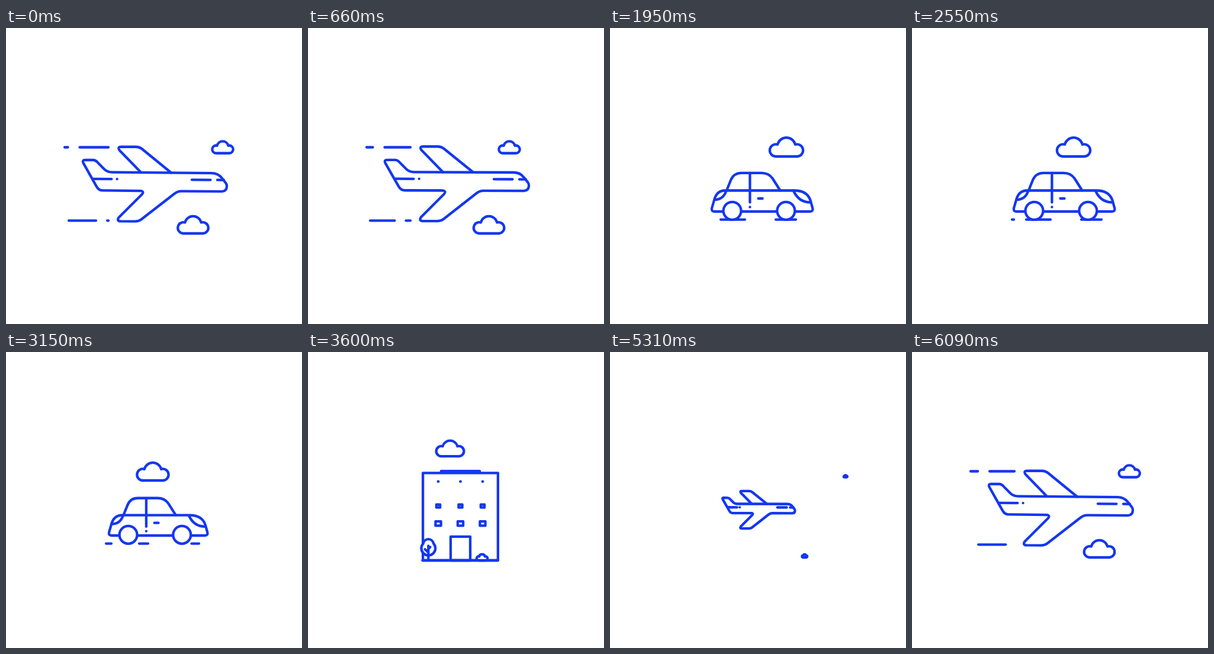
Write an HTML page that moves like this. It is 500 px wide and 500 px high and loops after 6.12 s.

```html
<!DOCTYPE html>
<html lang="en">
<head>
<meta charset="utf-8">
<title>Travel loop</title>
<style>
  html, body { margin: 0; width: 100%; height: 100%; overflow: hidden; background: #fff; }
  svg { display: block; width: 100vw; height: 100vh; }
  path {
    fill: none; stroke: #1437f0; stroke-width: 4.3;
    stroke-linecap: round; stroke-linejoin: round;
    vector-effect: non-scaling-stroke;
  }
  path.solid { fill: #fff; }
</style>
</head>
<body>
<svg id="stage" viewBox="0 0 500 500"></svg>
<script>
const LOOP = 6120, STEP = 30;
const SVG = 'http://www.w3.org/2000/svg';
const stage = document.getElementById('stage');

function add(parent, tag, attrs = {}) {
  const el = document.createElementNS(SVG, tag);
  for (const name in attrs) el.setAttribute(name, attrs[name]);
  return parent.appendChild(el);
}
const group = parent => add(parent, 'g');
const line = (parent, d) => add(parent, 'path', { d });
const solid = (parent, d) => add(parent, 'path', { d, class: 'solid' });

const unit = (t, start, length) => Math.min(1, Math.max(0, (t - start) / length));
const mix = (a, b, p) => a + (b - a) * p;
const outQuad = u => 1 - (1 - u) ** 2;
const outCubic = u => 1 - (1 - u) ** 3;
const outBack = u => 1 + 2.7 * (u - 1) ** 3 + 1.7 * (u - 1) ** 2;

function show(el, on) { el.setAttribute('display', on ? 'inline' : 'none'); }

// Puts the shape's anchor (ax, ay) at (x, y), scaled around it.
function place(el, x, y, sx, sy = sx, ax = 0, ay = 0) {
  show(el, sx > 0 && sy > 0);
  el.setAttribute('transform', `translate(${x} ${y}) scale(${sx} ${sy}) translate(${-ax} ${-ay})`);
}

const CLOUD = 'M18 0A10.3 10.3 0 1 0 15 -20.2A15.5 15.5 0 0 0 -15 -20.2A10.3 10.3 0 1 0 -18 0Z';
const box = (w, h) => `M${-w / 2} ${-h / 2}h${w}v${h}h${-w}Z`;

// Dashes running left inside a window; each is [right end, length].
function drawDashes(el, { y, left, right, dashes, period, speed }, t, size) {
  let d = '';
  if (size > 0) {
    for (const [end, length] of dashes) {
      const base = end - speed * t;
      const first = Math.floor((left - base) / period);
      for (let n = first; n < first + 5; n++) {
        const tip = base + n * period;
        const a = Math.max(left, tip - length * size);
        const b = Math.min(right, tip);
        if (b >= a) d += `M${a} ${y}H${b + 0.01}`;
      }
    }
  }
  el.setAttribute('d', d);
}

// Plane
const plane = group(stage);
const farCloud = solid(plane, CLOUD);
const nearCloud = solid(plane, CLOUD);
const topTrail = line(plane, '');
const lowTrail = line(plane, '');
const craft = group(plane);
line(craft, 'M228 243L191.5 206Q187.5 200 194 199.8H219Q225 200 229 203L279 243');
line(craft, 'M147 222.7H133Q128 223 130.5 228L153.5 268Q157 274 164 274H228Q234 275 230 280' +
  'L191 319.5Q187.5 325.5 194 325.7H219Q225 325.5 229 322.5L284 279Q290 274 297 274' +
  'H365Q373 273.5 373.2 265Q373.2 262 371 259L364 250.5Q358 243 347 243H179' +
  'Q171 243 166 238L155 227Q151 222.7 147 222.7Z');
line(craft, 'M148 254.5H178.5M187.7 254.5h.01M314 254.5H345.5M357 254.5H368');

function drawPlane(now) {
  const t = now > LOOP / 2 ? now - LOOP : now;
  const out = unit(t, 1290, 330) ** 2;
  const into = outCubic(unit(t, -830, 330));
  const tilt = 0.25 + 0.25 * Math.cos(Math.PI * Math.min(t, 1290) / 1290);
  const s = mix(0.4, 1, into) * mix(1, 0.5, out);
  craft.setAttribute('transform',
    `translate(251 270) scale(${s}) translate(-251 -270) rotate(${tilt} 110 245)`);

  const puff = into * (1 - out);
  place(farCloud, 366 - 0.0393 * t, 211.5, 0.63 * puff);
  place(nearCloud, 316 - 0.0157 * t, 347, 0.915 * puff);

  const size = unit(-t, -1350, 300);
  const reach = 173 - 0.215 * (t + 470);
  const live = t > -470 ? size : 0;
  drawDashes(topTrail, { y: 201.5, left: Math.max(99, reach), right: 173,
    dashes: [[104.5, 55]], period: 75, speed: 0.2198 }, t, live);
  drawDashes(lowTrail, { y: 325.3, left: Math.max(105, reach), right: 173,
    dashes: [[152, 46]], period: 65, speed: 0.2054 }, t, live);
}

// Car
const car = group(stage);
const carCloud = solid(car, CLOUD);
const road = line(car, '');
const shell = group(car);
line(shell, 'M191.5 310H176.5Q171 310 172 304.5L176.5 289Q180.5 275 194 274.5H311' +
  'Q333 274.5 338.5 291L342.3 304.5Q343.5 310 337.5 310H312.5M221.5 310H282');
line(shell, 'M197 274.5L204 257Q209 244.8 222 244.8H256Q268 244.8 274.5 254L287.5 274.5');
line(shell, 'M236.4 245V294.5M236.4 302.5h.01M250.5 288H257.5');
line(shell, 'M176.5 290Q191 290 196 276M310.5 276Q319 294 337.5 294.5');
const wheels = group(car);
for (const x of [206.5, 297.3])
  solid(wheels, `M${x - 15} 308.8a15 15 0 0 1 30 0a15 15 0 0 1 -30 0Z`);

function drawCar(t) {
  const u = unit(t, 3060, 390), out = u * u;
  const start = unit(t, 1600, 340);
  const into = outCubic(start);
  const s = mix(0.5, 1, into);
  place(shell, 257.5, 310, s * (1 - 0.45 * out), s * (1 - 0.56 * out), 257.5, 310);
  place(wheels, 257.5, 310, s * (1 - 0.5 * out * out), undefined, 257.5, 310);
  place(carCloud, 298 - 0.0417 * (t - 1950), 217 + 60 * (1 - outBack(start)), into * (1 - out));
  const size = unit(t, 1650, 200) * unit(-t, -3260, 300);
  drawDashes(road, { y: 323.6, left: 169, right: 330,
    dashes: [[228, 41], [314, 34]], period: 148, speed: 0.2367 }, t - 1950, size);
}

// Building
const house = group(stage);
const houseCloud = solid(house, CLOUD);
const roof = solid(house, 'M-52.5 0V-28H52.5V0Z');
const sign = line(house, 'M260 166.8h.01M270 166.8H297.5');
const walls = solid(house, 'M-67.5 0V-172H67.5V0Z');
const rows = [
  { y: 206, drop: 13, start: 3596 },
  { y: 242, drop: 26, start: 3535 },
  { y: 278, drop: 21, start: 3500 }
].map(row => ({ ...row, panes: [220, 257.5, 295].map(x => ({ x, el: line(house, box(21, 16.5)) })) }));
const door = line(house, 'M-18 0V-44H18V0Z');
const ground = line(house, '');
const tree = group(house);
solid(tree, 'M153.5 280A22.3 22.3 0 0 1 197.5 280A30 30 0 1 1 153.5 280Z');
line(tree, 'M175.5 290V352M161 304.5L175.5 318M183.5 295L175.5 302.5');
const bush = solid(house, CLOUD);

function drawHouse(t) {
  const leave = 1 - unit(t, 4930, 390) ** 2;
  const leaveFast = 1 - unit(t, 4930, 300) ** 2;
  const p = outCubic(unit(t, 3450, 400)) * leave;
  const top = 352 - 172 * mix(0.42, 1, p);

  place(houseCloud, 240 - 0.0373 * (t - 3600), 159 + 70 * (1 - p), 0.96 * mix(0.45, 1, p));
  place(walls, 257.5, 352, mix(0.75, 1, p), mix(0.42, 1, p));
  place(door, 257.5, 352, mix(0.67, 1, p), mix(0.63, 1, p));

  const r = outQuad(unit(t, 3580, 330)) * leaveFast;
  place(roof, 257.5, top, r > 0 ? mix(0.57, 1, r) : 0, r);
  place(sign, 260, top - 13.2 * r, unit(r, 0.75, 0.25), 1, 260, 166.8);

  for (const row of rows) {
    const s = outQuad(unit(t, row.start, 400)) * leaveFast;
    for (const pane of row.panes) place(pane.el, pane.x, row.y + row.drop * (1 - s), s);
  }

  const q = outQuad(unit(t, 3500, 450)) * leave;
  place(tree, 175.5 + 46 * (1 - q), 352, q, q, 175.5, 352);
  ground.setAttribute('d', `M${165.5 + 46 * (1 - q)} 352H${257.5 + 67.5 * mix(0.75, 1, p)}`);

  const b = outQuad(unit(t, 3530, 450)) * leave;
  place(bush, 329 - 49 * (1 - b), 352, 1.14 * b);
}

const scenes = [
  { el: plane, draw: drawPlane, on: t => t < 1600 || t >= 5290 },
  { el: car, draw: drawCar, on: t => t >= 1600 && t < 3450 },
  { el: house, draw: drawHouse, on: t => t >= 3450 && t < 5290 }
];

const origin = performance.now();
function frame() {
  const elapsed = (performance.now() - origin) % LOOP;
  const t = Math.floor(elapsed / STEP) * STEP;
  for (const scene of scenes) {
    const on = scene.on(t);
    show(scene.el, on);
    if (on) scene.draw(t);
  }
  requestAnimationFrame(frame);
}
frame();
</script>
</body>
</html>
```
